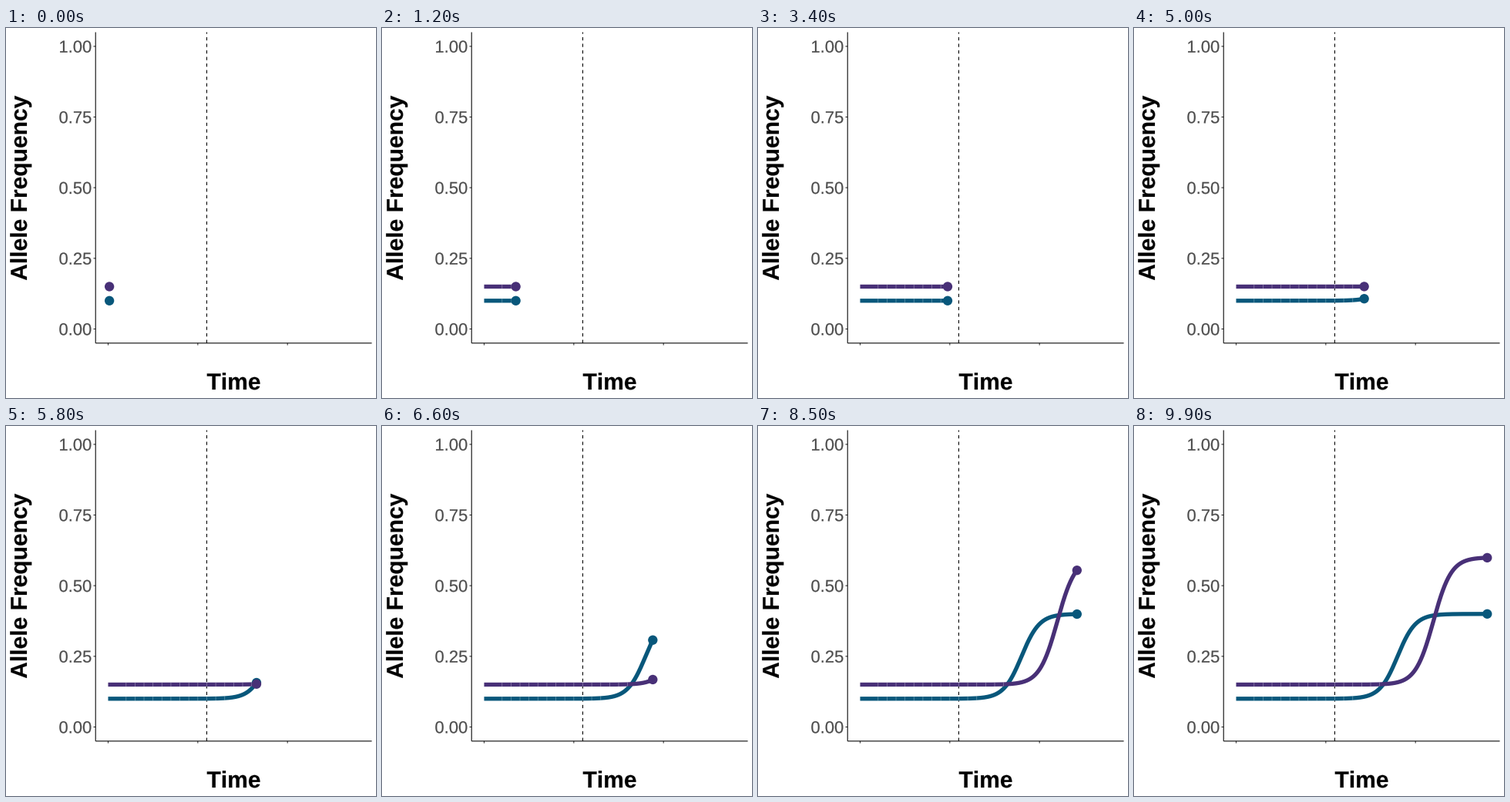
A matplotlib script for the animation above (10 s loop, 480x480 px).

```python
import numpy as np
import matplotlib.pyplot as plt
from matplotlib.animation import FuncAnimation
from matplotlib.patches import Circle, PathPatch
from matplotlib.textpath import TextPath
from matplotlib.transforms import Affine2D

SIZE, DPI = 480, 100
FRAMES, INTERVAL = 100, 100
T_MAX, T_SHIFT = 28, 11
LEFT, RIGHT, TOP, BOTTOM = 116.2, 474.52, 5.48, 408.8
PX = 72 / DPI  # points per pixel

plt.rcParams["text.kerning_factor"] = 6  # letters sit at plain advances


def to_x(t):
    return LEFT + (RIGHT - LEFT) * (t / T_MAX + 0.05) / 1.1


def to_y(freq):
    return BOTTOM - (BOTTOM - TOP) * (freq + 0.05) / 1.1


def sigmoid(t, low, high, mid):
    return low + (high - low) / (1 + np.exp(mid - t))


fig = plt.figure(figsize=(SIZE / DPI, SIZE / DPI), dpi=DPI, facecolor="white")
ax = fig.add_axes([0, 0, 1, 1])
ax.set(xlim=(0, SIZE), ylim=(SIZE, 0))
ax.axis("off")


def stroke(xs, ys, color="black", width=1.067, **kw):
    kw.setdefault("solid_capstyle", "butt")
    return ax.plot(xs, ys, color=color, lw=width * PX, snap=False, **kw)[0]


def label(x, y, text, size, color="black", weight="normal", anchor=0.5, turn=0):
    """Draw text as outlines, so that it keeps its sub-pixel position."""
    font = {"family": "Liberation Sans", "weight": weight}
    path = TextPath((0, 0), text, size=size, prop=font)
    box = path.get_extents()
    place = (Affine2D().translate(-box.x0 - anchor * box.width, 0)
             .scale(1, -1).rotate_deg(turn).translate(x, y))
    ax.add_patch(PathPatch(place.transform_path(path), fc=color, ec=color,
                           lw=0.2 * PX, snap=False))


# Axes, ticks and titles
stroke([LEFT, LEFT], [TOP, BOTTOM], zorder=6)
stroke([LEFT, RIGHT], [BOTTOM, BOTTOM], zorder=6)
for value in np.linspace(0, 1, 5):
    y = to_y(value)
    stroke([LEFT - 2.75, LEFT], [y, y], "#333333")
    label(LEFT - 5.8, y + 7.9, f"{value:.2f}", 22, "#4d4d4d", anchor=1)
for t in (0, 10, 20):
    stroke([to_x(t)] * 2, [BOTTOM, BOTTOM + 2.75], "#333333")
stroke([to_x(T_SHIFT)] * 2, [BOTTOM, TOP], ls=(0, (4, 4)),
       dash_capstyle="butt", zorder=1)
label((LEFT + RIGHT) / 2 - 0.2, 469, "Time", 30, weight="bold")
label(27, (TOP + BOTTOM) / 2 + 0.3, "Allele Frequency", 30, weight="bold",
      turn=-90)


class Allele:
    def __init__(self, color, low, high, mid, last_seam, z):
        self.curve = lambda t: to_y(sigmoid(t, low, high, mid))
        self.line = stroke([], [], color, 5.33, zorder=z,
                           solid_joinstyle="round")
        self.dot = ax.add_patch(Circle((0, 0), 6.15, fc=color, lw=0, zorder=5))
        # Faint joints between unit-long pieces of the flat stretch
        self.seams = []
        for t in range(2, last_seam + 1):
            y = self.curve(t)
            seam = stroke([to_x(t)] * 2, [y - 2.67, y + 2.67], "white", 0.8,
                          alpha=0.35, zorder=z + 0.1)
            self.seams.append((t, seam))

    def show(self, now):
        t = np.append(np.arange(0, now, 0.05), now)
        self.line.set_data(to_x(t), self.curve(t))
        self.dot.center = (to_x(now), self.curve(now))
        for start, seam in self.seams:
            seam.set_visible(start < now)


alleles = [
    Allele("#08577b", 0.10, 0.40, 18, 13, 2),
    Allele("#483077", 0.15, 0.60, 22, 16, 3),
]


def update(i):
    now = min((i + 0.5) * T_MAX / (FRAMES - 1), T_MAX)
    for allele in alleles:
        allele.show(now)


anim = FuncAnimation(fig, update, frames=FRAMES, interval=INTERVAL,
                     repeat=True, repeat_delay=0)
plt.show()
```
